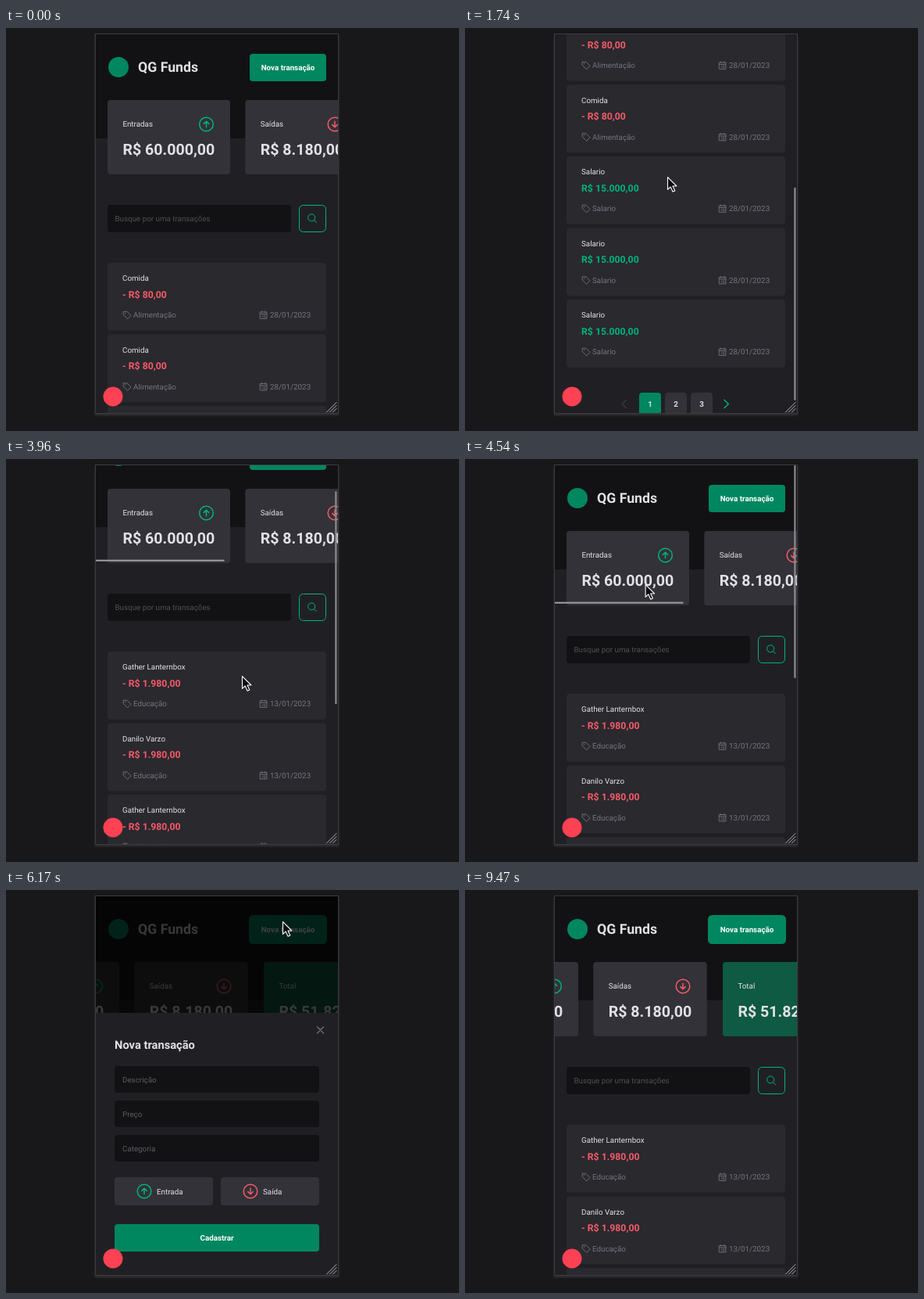
Animation of 580 by 515 pixels, one loop 9640 ms. Source, as an HTML page:

```html
<!DOCTYPE html>
<html lang="pt-BR">
<head>
<meta charset="utf-8">
<title>Transações</title>
<style>
html, body { margin: 0; width: 100%; height: 100%; overflow: hidden; background: #18181a; }
svg { display: block; width: 580px; height: 515px; font: 9.8px Roboto, Arial, sans-serif; fill: #e1e1e6; text-rendering: geometricPrecision; }
.b { font-weight: 700; }
.line { fill: none; stroke-linecap: round; stroke-linejoin: round; }
.frame { filter: drop-shadow(0 2px 1.5px rgba(115, 115, 115, .3)); }
</style>
</head>
<body>
<svg id="stage" viewBox="0 0 580 515"></svg>
<script>
const LOOP = 9640;
const GREEN = '#00b37e', DEEP = '#00875f', RED = '#f75a68', GRAY = '#74747f';

const rect = (x, y, w, h, fill, more = '') =>
  `<rect x="${x}" y="${y}" width="${w}" height="${h}" fill="${fill}" ${more}/>`;
const box = (x, y, w, h, fill, more = '', r = 4) => rect(x, y, w, h, fill, `rx="${r}" ${more}`);
const text = (x, y, s, fill = '#e1e1e6', more = '') =>
  `<text x="${x}" y="${y}" fill="${fill}" ${more}>${s}</text>`;
const bold = (x, y, s, size, fill, more = '') =>
  text(x, y, s, fill, `class="b" font-size="${size}" ${more}`);
const line = (d, color, width = 1, more = '') =>
  `<path class="line" d="${d}" stroke="${color}" stroke-width="${width}" ${more}/>`;
const mid = 'text-anchor="middle"';

function arrowIcon(x, color, dir) {
  const tip = 123 - 3.8 * dir;
  return `<circle cx="${x}" cy="123" r="8.8" fill="none" stroke="${color}" stroke-width="1.5"/>` +
    line(`M${x} ${123 + 3.8 * dir}V${tip}M${x - 3.2} ${tip + 3.2 * dir}L${x} ${tip}l3.2 ${3.2 * dir}`, color, 1.5);
}

function summary(x, w, fill, label, value) {
  return box(x, 92, w, 95, fill) + text(x + 19.4, 126, label) + bold(x + 19.4, 162, value, 19.6);
}

function item(i, [name, value, category], date) {
  const spent = value[0] === '-';
  return `<g transform="translate(0 ${i * 91.5})">` +
    box(130, 300, 280, 86.8, '#29292e') +
    text(149, 323.4, name) +
    bold(149, 344.8, value, 12.25, spent ? RED : GREEN) +
    line('M150.5 362.3h4.4l5.2 5.1-4.5 4.5-5.1-5.2z', GRAY, .9) +
    `<circle cx="152.7" cy="364.5" r=".7" fill="${GRAY}"/>` +
    text(163, 370, category, GRAY) +
    line('M325.6 363h8.3v8.4h-8.3zM325.6 365.5h8.3M327.6 362v1.6M331.9 362v1.6', GRAY, .9) +
    line('M328.2 367.3v2.4M330.4 367.3h1.5v2.4h-1.5z', GRAY, .6) +
    text(338, 370, date, GRAY) + '</g>';
}

function pager(first, prevOn, nextOn) {
  const tone = on => on ? GREEN : '#37373d';
  return line('M206.5 794.2l-5.4 5.2 5.4 5.2', tone(prevOn), 1.4) +
    [0, 1, 2].map(i => box(223 + 33 * i, 785, 28, 28, i ? '#323238' : DEEP) +
      bold(237 + 33 * i, 803, first + i, 9.8, '#e1e1e6', mid)).join('') +
    line('M332 794.2l5.4 5.2-5.4 5.2', tone(nextOn), 1.4);
}

const food = ['Comida', '- R$ 80,00', 'Alimentação'];
const salary = ['Salario', 'R$ 15.000,00', 'Salario'];
const course = ['Gather Lanternbox', '- R$ 1.980,00', 'Educação'];
const tutor = ['Danilo Varzo', '- R$ 1.980,00', 'Educação'];
const burger = ['Hamburger', '- R$ 50,00', 'Alimentação'];

const list = (rows, date) => rows.map((r, i) => item(i, r, date)).join('');

const field = (y, label) => box(139, y, 262, 34, '#121214') + text(149, y + 20.5, label, '#5c5c66');
const choice = (x, label, color, dir) => box(x, 367, 126, 36, '#323238') +
  `<g transform="translate(0 262)">${arrowIcon(x + 38, color, dir)}</g>` + text(x + 54, 388.5, label);

const form = rect(115, 8, 310, 484, '#000', 'opacity=".75"') +
  rect(115, 157, 310, 335, '#202024') +
  bold(139, 203, 'Nova transação', 14.7) +
  line('M398.5 175l8 8m0-8l-8 8', GRAY, 1.2) +
  field(225, 'Descrição') + field(269, 'Preço') + field(313, 'Categoria') +
  choice(139, 'Entrada', GREEN, 1) + choice(275, 'Saída', RED, -1) +
  box(139, 427, 262, 35, DEEP) + bold(270, 448, 'Cadastrar', 9.8, '#fff', mid);

document.getElementById('stage').innerHTML =
  '<clipPath id="view"><rect x="115" y="8" width="310" height="484"/></clipPath>' +
  rect(0, 0, 580, 515, '#18181a') +
  rect(114.5, 7.5, 311, 485, '#202024', 'stroke="#3b3b3f" class="frame"') +
  '<g clip-path="url(#view)"><g id="page">' +
    rect(115, 8, 310, 133, '#121214') +
    `<circle cx="144" cy="50" r="13" fill="${DEEP}"/>` +
    bold(169, 56.2, 'QG Funds', 17.7) +
    box(311, 32, 100, 37, DEEP, 'id="focus"', 5.5) +
    box(312, 33, 98, 35, DEEP) +
    bold(361, 54, 'Nova transação', 9.8, '#fff', mid) +
    '<g id="cards">' +
      summary(130, 157, '#323238', 'Entradas', 'R$ 60.000,00') + arrowIcon(256.5, GREEN, 1) +
      summary(306.3, 145.5, '#323238', 'Saídas', 'R$ 8.180,00') + arrowIcon(421, RED, -1) +
      summary(472, 157, '#0e5a42', 'Total', 'R$ 51.820,00') +
    '</g>' +
    rect(115, 182.7, 164.5, 2, '#a0a0a3', 'id="hbar"') +
    box(130, 226, 235, 35, '#121214') +
    text(139.5, 247.2, 'Busque por uma transações', '#4e4e55') +
    box(375.5, 226.5, 34, 34, 'none', `stroke="${GREEN}"`, 5) +
    `<circle cx="391.2" cy="242.4" r="4.5" fill="none" stroke="${GREEN}"/>` +
    line('M394.5 245.7l3 3', GREEN) +
    `<g id="first">${list([food, food, salary, salary, salary], '28/01/2023')}${pager(1, false, true)}</g>` +
    `<g id="second">${list([course, tutor, course, burger, burger], '13/01/2023')}${pager(2, true, false)}` +
      box(255.5, 784.5, 29, 29, 'none', `stroke="${DEEP}"`, 5) + '</g>' +
  '</g>' +
  `<g id="form">${form}</g>` +
  rect(421.3, 8, 2.2, 272, '#8c8c8f', 'id="vbar" rx="1"') +
  `<circle cx="137" cy="471" r="12.5" fill="#ff4154"/>` +
  line('M410.5 491l12.5-12.5M414.5 491l8.5-8.5M418.5 491l4.5-4.5', '#b4b4b6', 1) +
  '</g>' +
  '<path id="cursor" d="M.5.6V16.4L4.2 13l2.9 6.3 2.7-1.2L7 12h4.9z" fill="#0b0b0c" stroke="#fff" stroke-width="1.1" stroke-linejoin="round"/>';

const el = id => document.getElementById(id);
const [page, cards, first, second, focus, formBox, vbar, hbar, cursor] =
  ['page', 'cards', 'first', 'second', 'focus', 'form', 'vbar', 'hbar', 'cursor'].map(el);

const scrollKeys = [[440, 0], [950, 153], [1370, 222], [1800, 326], [2330, 344], [3750, 344], [3960, 54], [4180, 0]];
const slideKeys = [[4750, 0], [5050, 132.8], [5160, 142]];
const cursorKeys = [
  [440, 259, 190], [1900, 259, 190], [2560, 263, 448], [3040, 263, 448], [3200, 323, 372], [3390, 302, 277],
  [4250, 302, 277], [4700, 202, 113], [5550, 202, 113], [5910, 354, 40], [6450, 354, 40], [6980, 409, 178],
  [7220, 409, 178], [7290, 409, 189], [8030, 420, 483]
];

// Monotone cubic through keys [time, value, ...]; k picks the value
function track(keys, t, k = 1) {
  const last = keys.length - 1;
  if (t <= keys[0][0]) return keys[0][k];
  if (t >= keys[last][0]) return keys[last][k];
  const i = keys.findIndex(p => p[0] > t) - 1;
  const slope = n => n < 0 || n >= last ? 0 : (keys[n + 1][k] - keys[n][k]) / (keys[n + 1][0] - keys[n][0]);
  const tangent = n => {
    const a = slope(n - 1), b = slope(n);
    return a * b > 0 ? 2 * a * b / (a + b) : 0;
  };
  const [p, q] = [keys[i], keys[i + 1]], h = q[0] - p[0], u = (t - p[0]) / h;
  const ease = u * u * (3 - 2 * u);
  return p[k] + (q[k] - p[k]) * ease +
    h * u * (1 - u) * (tangent(i) * (1 - u) - tangent(i + 1) * u);
}

const within = (t, a, b) => t >= a && t < b;
const show = (node, on) => node.setAttribute('display', on ? 'inline' : 'none');
const move = (node, x, y) => node.setAttribute('transform', `translate(${x.toFixed(2)} ${y.toFixed(2)})`);
// Visible from a, fading out between b and c
const fade = (t, a, b, c) => t < a ? 0 : Math.max(0, Math.min(1, (c - t) / (c - b)));

function draw(t) {
  const scroll = Math.round(track(scrollKeys, t)), slide = track(slideKeys, t);
  move(page, 0, -scroll);
  move(cards, -slide, 0);
  move(hbar, slide * .667, 0);
  move(vbar, 0, scroll * .614);
  vbar.setAttribute('opacity', Math.max(fade(t, 440, 5170, 5330), fade(t, 7240, 8220, 8640)));
  hbar.setAttribute('opacity', fade(t, 3750, 5210, 5370));
  show(first, t < 2780);
  show(second, t >= 2780);
  show(focus, t >= 6130);
  show(formBox, within(t, 6130, 7240));
  show(cursor, within(t, 440, 8030));
  move(cursor, track(cursorKeys, t, 1), track(cursorKeys, t, 2));
}

const start = performance.now();
function tick() {
  draw((performance.now() - start) % LOOP);
  requestAnimationFrame(tick);
}
tick();
</script>
</body>
</html>
```
